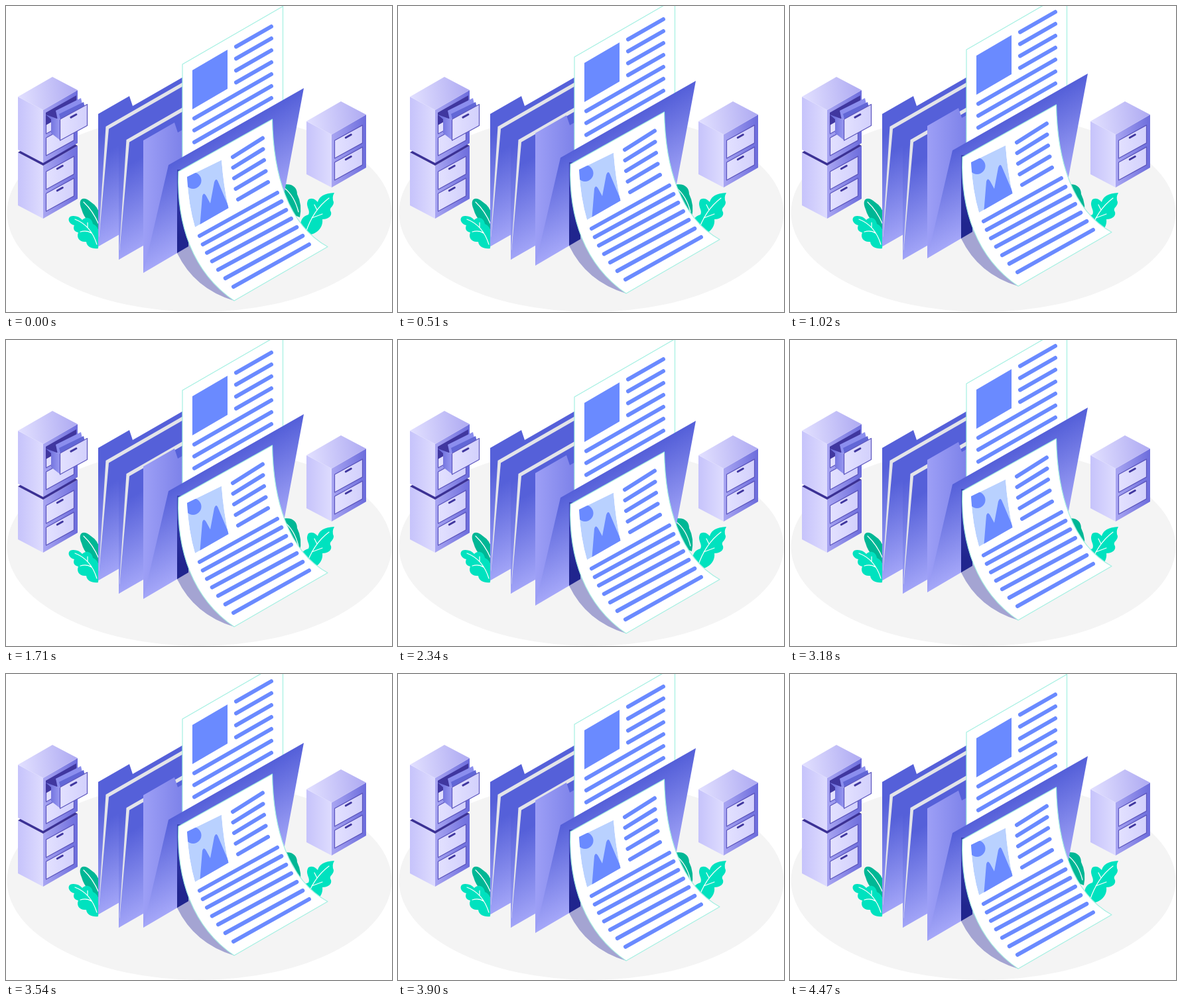
An HTML page with a canvas for the animation above (4500 ms loop, 582 by 462 pixels).

```html
<!DOCTYPE html>
<html lang="en">
<head>
<meta charset="utf-8">
<title>Documents</title>
<style>
html, body { margin: 0; width: 100%; height: 100%; overflow: hidden; background: #fff; }
canvas { display: block; width: 582px; height: 462px; }
</style>
</head>
<body>
<canvas id="stage" width="582" height="462"></canvas>
<script>
const ctx = document.getElementById('stage').getContext('2d');
const LOOP = 4500, TICK = 30, STEPS = 100, RISE = STEPS / 4;
const ISO = 0.575, HIDDEN = 267;
const BLUE = '#6a8aff', SKY = '#b9d1ff', INDIGO = '#5560d9', LILAC = '#a6a8f9';
const INK = '#40379f', MINT = '#a4f0e2', TEAL = '#00e2bf', DEEP = '#00b795';

function linear(x0, y0, x1, y1, ...colors) {
  const g = ctx.createLinearGradient(x0, y0, x1, y1);
  colors.forEach((c, i) => g.addColorStop(i / (colors.length - 1), c));
  return g;
}

// Fade perpendicular to the isometric edges
const slant = (x, y, d, ...colors) => linear(x, y, x + d * 0.49, y + d * 0.87, ...colors);

function shape(d, fill, stroke, width = 1.2) {
  const path = new Path2D(d);
  if (fill) { ctx.fillStyle = fill; ctx.fill(path); }
  if (stroke) {
    ctx.strokeStyle = stroke;
    ctx.lineWidth = width;
    ctx.stroke(path);
  }
}

// Parallelogram from one corner and two edge vectors
function slab(fill, x, y, ax, ay, bx, by, stroke) {
  shape(`M${x} ${y}l${ax} ${ay}l${bx} ${by}l${-ax} ${-ay}z`, fill, stroke);
}

function line(x0, y0, x1, y1, color = BLUE, width = 6) {
  shape(`M${x0} ${y0}L${x1} ${y1}`, null, color, width);
}

function drawer(x, y, w = 42, h = 27) {
  const up = w * 0.55;
  slab(linear(x, y, x + w, y, '#e3e1ff', '#d2d0fc'), x, y, w, -up, 0, h, '#5b55bd');
  const hx = x + w * 0.4, hy = y + h * 0.23 - w * 0.25;
  line(hx, hy, hx + 8, hy - 4.4, INK, 3);
}

function cabinet(x, y, lid = linear(x, y, x + 90, y - 10, '#e2e0ff', '#aeaaf2')) {
  const h = 80;
  slab(linear(x, y, x + 38, y, '#c6c3fb', '#dedcfe'), x, y, 38, 20, 0, h);
  slab(linear(x + 38, y, x + 90, y, '#a9a6f2', '#6c6cdc'), x + 38, y + 20, 52, -30, 0, h);
  slab(lid, x, y, 52, -30, 38, 20);
  for (let i = 0; i < 2; i++) drawer(x + 42.5, y + 29 + 33 * i);
}

function openDrawer() {
  slab(INK, 60, 161, 46, -26, 0, 19);
  slab('#8b8eee', 75, 158, 38, -19, 3, 14);
  slab('#6267d6', 80, 163, 37, -18, 3, 12);
  shape('M60 164L82 172V203L68 192V171z', linear(66, 0, 82, 0, '#6f70dc', '#9a9af2'));
  drawer(81.5, 171, 41, 32);
}

function plants() {
  shape('M141 339C128 330 118 322 114 307C107 291 117 286 128 296Q139 303 141 315z', DEEP);
  shape('M117 296Q131 309 140 330', null, '#fff');
  shape('M139 366C130 367 122 364 121 356C110 357 106 349 109 342C100 340 102 333 103 331C92 328 92 316 102 317Q110 317 115 323C122 316 130 321 131 329Q139 332 140 343z', TEAL);
  shape('M104 322Q128 331 137 360M123 334V327M112 341Q122 338 129 343', null, '#fff');

  shape('M414 271C430 266 439 273 439 284Q447 300 443 319L425 312z', DEEP);
  shape('M420 275Q435 287 441 311', null, '#fff');
  shape('M495 282Q491 289 494 296C494 304 486 304 490 311C492 319 483 322 477 322C479 337 464 348 450 345L444 332Q444 318 456 315C460 308 450 302 456 292Q463 288 470 296Q473 283 495 282z', TEAL);
  shape('M487 290Q463 308 452 342M469 308L465 300M461 320L477 314', null, '#fff');
}

// Back panel with its tab, from the bottom-left corner
function panel(x, y, fill) {
  const reach = HIDDEN - x - 52;
  shape(`M${x} ${y}v-200l47 -27l5 15l${reach} ${-reach * ISO}V${y - 73}z`, fill);
}

// Leaning sheet: top-left corner is inset from the bottom-left one
function leaf(x, y, inset, height, fill) {
  const top = HIDDEN - x - inset, base = HIDDEN - x;
  shape(`M${x} ${y}l${inset} ${-height}l${top} ${-top * ISO}V${y - base * ISO}z`, fill);
}

function closedFolder(x, y) {
  panel(x, y, slant(x + 11, y - 173, 155, INDIGO, LILAC));
  leaf(x + 1, y - 14, 10.5, 167, '#e3e4e9');
  leaf(x, y, 16, 177.5, slant(x + 26, y - 150, 125, INDIGO, LILAC));
}

function backPage() {
  slab('#fff', 266, 88, 151.5, -87.5, 0, 170, MINT);
  slab(BLUE, 281, 97, 53, -31, 0, 59);
  for (let i = 0; i < 9; i++) {
    const x = i < 4 ? 347 : 284, y = 31 + 18 * i;
    line(x, y + (400 - x) * ISO, 400, y);
  }
}

function picture() {
  ctx.save();
  const frame = new Path2D('M273 258L325 232.500Q328 272 335.500 305L285 334Q275 300 273 258z');
  ctx.clip(frame);
  ctx.fillStyle = SKY;
  ctx.fill(frame);
  ctx.beginPath();
  ctx.arc(282, 263.5, 12.5, 0, 7);
  ctx.fillStyle = BLUE;
  ctx.fill();
  shape('M292 336L296 287Q298 280 302 287L308 298L314 266Q317 258 320 266L337 306L300 336z', BLUE);
  ctx.restore();
}

function frontPage() {
  shape('M260 250C257 330 281 402 344 445L485 363.500C424 330 403 252 401.500 171z', '#fff', MINT);
  picture();
  for (let i = 0; i < 5; i++) {
    const bend = 0.5 * i * i;
    line(342 + bend, 228 + 16 * i, 387 + bend, 199.5 + 16.6 * i);
  }
  for (let i = 0; i < 7; i++) {
    line(292 + 4 * i + 0.75 * i * i, 347 + 12.8 * i, 409 + 6 * i + i * i / 3, 282 + 13 * i);
  }
}

function openFolder() {
  panel(207, 403, linear(207, 0, 270, 0, '#9d9ff6', '#7b80e8'));
  backPage();
  shape('M245 240L449 124L420 280L258 373L207 403z', slant(300, 210, 124, INDIGO, LILAC));
  shape('M258 373L275 350L344 445Q284 427 258 373z', '#a4a4d2');
  shape('M258 247H275V363L258 373z', linear(0, 250, 0, 350, '#3c43b6', '#20258e'));
  frontPage();
}

// One pixel per step, up and down twice, with a slight drag in the pace
function lift(ms) {
  const t = Math.floor(ms / TICK) * TICK;
  const even = t * STEPS / (LOOP - TICK);
  const step = Math.round(even - Math.sin(2 * Math.PI * t / LOOP)) % (2 * RISE);
  return RISE - Math.abs(RISE - step);
}

function draw(ms) {
  ctx.fillStyle = '#fff';
  ctx.fillRect(0, 0, 582, 462);
  ctx.lineCap = 'round';
  ctx.lineJoin = 'round';
  ctx.beginPath();
  ctx.ellipse(291.5, 312, 290, 150, 0, 0, 2 * Math.PI);
  ctx.fillStyle = '#f4f4f4';
  ctx.fill();
  cabinet(18, 221, '#3b3195');
  cabinet(18, 137);
  openDrawer();
  cabinet(453, 174);
  plants();
  for (let i = 0; i < 2; i++) closedFolder(139 + 31 * i, 363 + 20 * i);
  ctx.save();
  ctx.translate(0, -lift(ms));
  openFolder();
  ctx.restore();
}

const start = performance.now();
function tick() {
  draw((performance.now() - start) % LOOP);
  requestAnimationFrame(tick);
}
tick();
</script>
</body>
</html>
```
